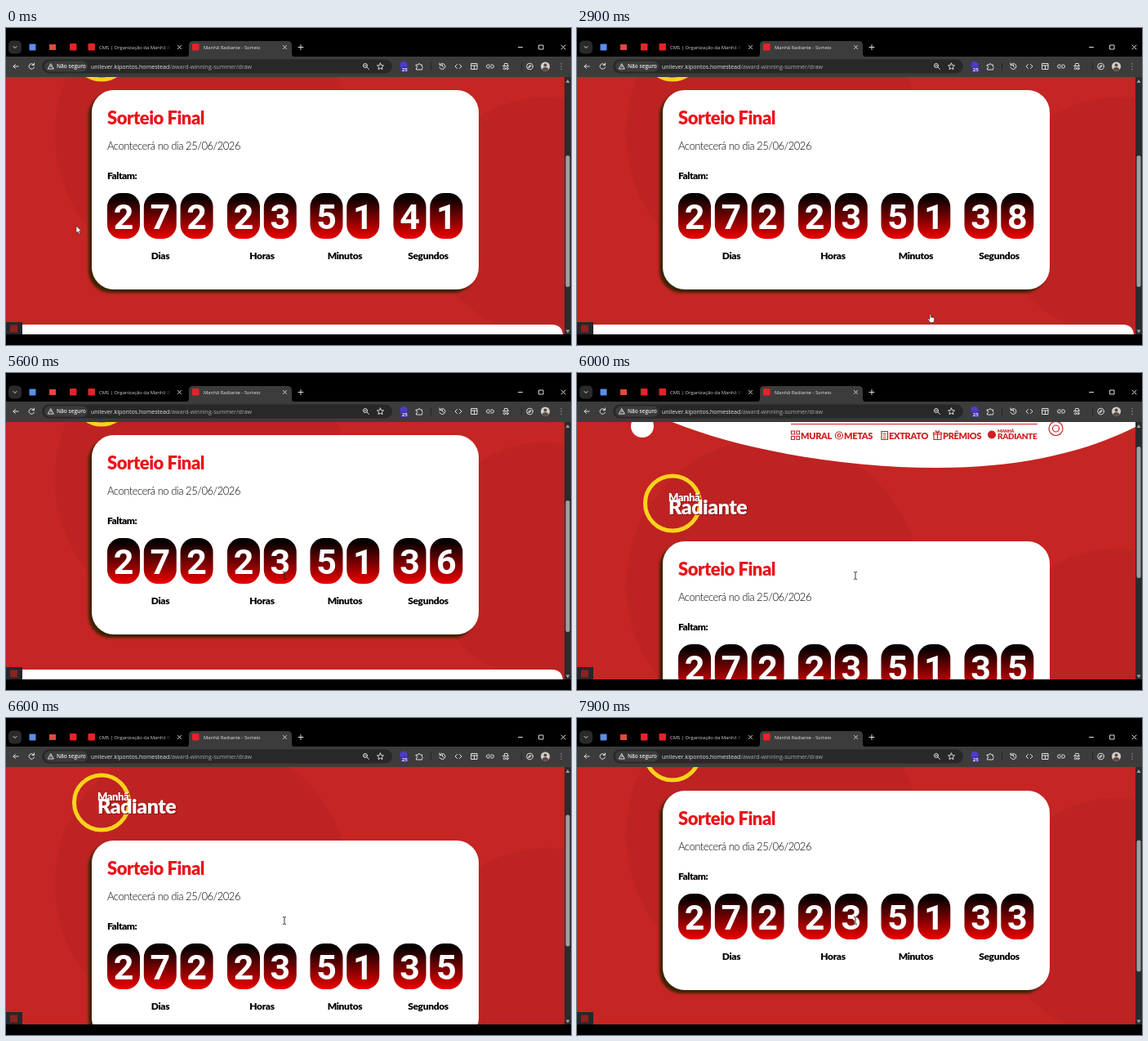
Animation of 692 by 388 pixels, one loop 8 s. Source, as an HTML page:

```html
<!DOCTYPE html>
<html lang="pt-BR">
<head>
<meta charset="utf-8">
<title>Sorteio</title>
<style>
  html, body { margin: 0; width: 100%; height: 100%; overflow: hidden; background: #000; }
  svg { display: block; width: 692px; height: 388px; }
  .ui { font-family: "Open Sans", "Noto Sans", sans-serif; fill: #e3e3e3; }
  .fun { font-family: Lato, "Open Sans", sans-serif; font-weight: 900; letter-spacing: -.03em; }
  .thin { font-weight: 300; }
  .digit { font: 700 43px Roboto, "Liberation Sans", sans-serif; fill: #fff; text-anchor: middle; }
  .label { font-size: 12px; text-anchor: middle; }
  .menu { fill: #cf2120; font-size: 11px; }
  .line { fill: none; stroke: #dedede; stroke-width: 1; stroke-linecap: round; stroke-linejoin: round; }
  .red { fill: none; stroke: #cf2120; stroke-width: 1.2; }
</style>
</head>
<body>
<svg viewBox="0 0 692 388" xmlns="http://www.w3.org/2000/svg">
  <defs>
    <linearGradient id="pill" x2="0" y2="1">
      <stop offset=".1" stop-color="#080000"/>
      <stop offset="1" stop-color="#ee0000"/>
    </linearGradient>
    <linearGradient id="fade" gradientUnits="userSpaceOnUse" x1="114" x2="203" y1="0" y2="0">
      <stop offset=".86" stop-color="#d5d5d5"/>
      <stop offset="1" stop-color="#d5d5d5" stop-opacity="0"/>
    </linearGradient>
    <filter id="soft" x="-10%" y="-10%" width="120%" height="120%">
      <feGaussianBlur stdDeviation="1.8"/>
    </filter>
    <clipPath id="view"><rect y="60" width="684" height="315"/></clipPath>
    <clipPath id="face"><circle cx="660.5" cy="47" r="5.5"/></clipPath>
  </defs>

  <rect width="692" height="388"/>

  <!-- Page -->
  <g clip-path="url(#view)">
    <rect y="60" width="684" height="315" fill="#c52523"/>
    <g id="page">
      <circle cx="240" cy="130" r="180" fill="#bd2322"/>
      <circle cx="660" cy="230" r="145" fill="#bd2322"/>

      <g transform="translate(0 -130)">
        <path d="M60 10L112 58C200 95 330 116 440 116C540 116 620 98 684 66V-80H60Z" fill="#fff"/>
        <circle cx="80" cy="65" r="14" fill="#fff"/>
        <path class="red" d="M262 62.5H564" stroke-width=".7"/>
        <g class="red">
          <path d="M262.5 71h4v4h-4zM269 71h3.5v4H269zM262.5 77.500h4v4h-4zM269 77.500h3.500v4H269z"/>
          <circle cx="321" cy="76.500" r="4.500"/><circle cx="321" cy="76.500" r="1.800"/>
          <path d="M373 71.500h7.500v10H373zM375 74.500h3.500M375 77h3.500M375 79.500h3.500"/>
          <path d="M437 75h9v6.500h-9zM436.500 73h10v2h-10zM441.500 73v8.500M441.500 73l-2.500-2.500M441.500 73l2.500-2.500"/>
          <circle cx="586.500" cy="68" r="8.500"/><circle cx="586.500" cy="68" r="4"/>
        </g>
        <circle cx="508" cy="75.500" r="5" fill="#cf2120"/>
        <g class="fun menu">
          <text x="274" y="80.500">MURAL</text>
          <text x="327" y="80.500">METAS</text>
          <text x="382" y="80.500">EXTRATO</text>
          <text x="448" y="80.500">PRÊMIOS</text>
          <text x="515" y="72.500" font-size="5.500">MANHÃ</text>
          <text x="515" y="81" font-size="10">RADIANTE</text>
        </g>
      </g>

      <circle cx="117" cy="29.500" r="33.500" fill="none" stroke="#fbd21c" stroke-width="5"/>
      <g class="fun" id="brand"></g>

      <rect x="101" y="80" width="474" height="244" rx="27" fill="#3d2200" filter="url(#soft)"/>
      <rect x="105" y="76" width="474" height="244" rx="27" fill="#fff"/>
      <g class="fun">
        <text x="124" y="117.500" font-size="22" fill="#e9151b">Sorteio Final</text>
        <text x="124" y="149" font-size="13" class="thin">Acontecerá no dia 25/06/2026</text>
        <text x="124" y="184.500" font-size="12">Faltam:</text>
      </g>
      <g id="clock"></g>
      <path d="M0 375V363H668Q682 363 682 377V400H0Z" fill="#fff"/>
    </g>
    <rect y="360" width="20" height="15" fill="#26262c"/>
    <rect x="5" y="363.500" width="9" height="9" fill="#8d211c"/>
  </g>

  <!-- Scrollbar -->
  <rect x="684" y="60" width="8" height="315" fill="#2b2b2b"/>
  <path d="M685.500 67l2.500-4 2.500 4zM685.500 369.500l2.500 4 2.500-4z" fill="#a0a0a0"/>
  <rect id="thumb" x="685.500" y="156" width="5" height="161" rx="2.500" fill="#9f9f9f"/>

  <!-- Tabs -->
  <g class="ui">
    <rect x="3" y="15.500" width="16" height="16" rx="5" fill="#2a2a2a"/>
    <path class="line" d="M9 22.500l2 2 2-2"/>
    <rect x="28.500" y="19.500" width="8" height="8" rx="1" fill="#5b8fe8"/>
    <rect x="53" y="20" width="8" height="7" fill="#e2483d"/>
    <rect x="78" y="19" width="8.500" height="8.500" rx="1" fill="#e8222a"/>
    <rect x="100.500" y="19" width="8.500" height="8.500" rx="1" fill="#e8222a"/>
    <text x="114" y="25.700" font-size="5.900" fill="url(#fade)">CMS | Organização da Manhã R</text>
    <path d="M219 36q5 0 5-5V21q0-5 5-5H345q5 0 5 5V31q0 5 5 5Z" fill="#3c3c3c"/>
    <rect x="228" y="19" width="8.500" height="8.500" rx="1" fill="#e8222a"/>
    <text x="242" y="25.700" font-size="5.900">Manhã Radiante - Sorteio</text>
    <path class="line" stroke-width=".9" d="M210.500 21.500l4 4m0-4l-4 4M339.500 21.500l4 4m0-4l-4 4M358 23.500h6m-3-3v6M627.500 23.500h5M653 21h5v5h-5zM680 21l5 5m0-5l-5 5"/>
  </g>

  <!-- Toolbar -->
  <rect y="35" width="692" height="25" fill="#3c3c3c"/>
  <rect x="44" y="38.500" width="429" height="17" rx="8.500" fill="#282828"/>
  <rect x="47" y="40.500" width="53" height="13" rx="6.500" fill="#3c3c3c"/>
  <g class="ui">
    <text x="62" y="49.400" font-size="6.500" font-weight="600">Não seguro</text>
    <text x="104" y="49.500" font-size="7.100">unilever.kipontos.homestead<tspan fill="#a9a9a9">/award-winning-summer/draw</tspan></text>
  </g>
  <g class="line">
    <path d="M15 47H9m2.500-2.500L9 47l2.500 2.500"/>
    <path d="M34 45a3.300 3.300 0 1 0 .5 3M34.500 43v2.500H32"/>
    <path d="M55 44l3.300 6h-6.600zM55 46.300v1.500"/>
    <circle cx="440" cy="46" r="2.500"/><path d="M442 48l2.500 2.500M439 46h2"/>
    <path d="M458.500 43l1.200 2.600 2.800.3-2.100 1.900.6 2.800-2.500-1.400-2.500 1.400.6-2.800-2.100-1.900 2.800-.3z"/>
    <path d="M502.500 45h2.300a1.300 1.300 0 0 1 2.600 0h2.100v2.300a1.300 1.300 0 0 1 0 2.400v1.300h-7v-2a1.300 1.300 0 0 0 0-2.600z"/>
    <path d="M531.500 45a3.500 3.500 0 1 1-.5 3M531 43v2.500h2.500M534.500 45v2l1.500 1"/>
    <path d="M552.500 44.500l-2.500 2.500 2.500 2.500m3-5l2.500 2.500-2.500 2.500"/>
    <path d="M570 43.500h7v7h-7zM570 46h7M573.500 46v4.500"/>
    <path d="M592 45h-1.500a2 2 0 0 0 0 4h1.500m2-4h1.500a2 2 0 0 1 0 4H594m-2.500-2h3"/>
    <path d="M608.500 46.500h7M610 46.500l.6-3h3.600l.6 3"/><circle cx="610.500" cy="49.500" r="1.300"/><circle cx="614" cy="49.500" r="1.300"/>
    <circle cx="641.500" cy="47" r="3.800"/><path d="M640 48.500q0-3 3-3 0 3-3 3"/>
  </g>
  <path d="M520.500 42.500v9M631.500 42.500v9" stroke="#252525"/>
  <circle cx="487" cy="45.500" r="4.500" fill="#4c3bd0"/>
  <rect x="483.500" y="47" width="9.500" height="7" rx="1.500" fill="#4334a8"/>
  <text class="ui" x="488.300" y="52.800" font-size="6" font-weight="700" text-anchor="middle">25</text>
  <g clip-path="url(#face)">
    <rect x="654" y="41" width="13" height="13" fill="#d4cfcb"/>
    <circle cx="660.500" cy="45.500" r="2" fill="#5c4a44"/><ellipse cx="660.500" cy="52" rx="4" ry="4" fill="#5c4a44"/>
  </g>
  <path d="M680 43.800v.1M680 47v.1M680 50.200v.1" class="line" stroke-width="1.500"/>

  <!-- Pointer shapes, hot spot at 0,0 -->
  <g id="pointer">
    <path id="arrow" d="M0 0V9L2.100 7.200 3.500 10.300 4.900 9.700 3.500 6.700H6.300Z" fill="#fff" stroke="#222" stroke-width=".6"/>
    <path id="hand" d="M0 .8Q.8-.3 1.600.8V4L5 4.600Q6 4.800 5.800 6L5 10.500H.6L-2.200 6.600Q-2 5.300-.8 6L0 6.700Z" fill="#fff" stroke="#222" stroke-width=".6"/>
    <path id="beam" d="M-2-4Q0-4 0-3Q0-4 2-4M0-3V4M-2 5Q0 5 0 4Q0 5 2 5" fill="none" stroke="#222" stroke-width=".9"/>
  </g>
</svg>
<script>
const LOOP = 8000, STEP = 100;
const $ = id => document.getElementById(id);

function add(parent, tag, attrs, text = "") {
  const el = document.createElementNS("http://www.w3.org/2000/svg", tag);
  for (const k in attrs) el.setAttribute(k, attrs[k]);
  el.textContent = text;
  return parent.appendChild(el);
}

// Title lettering with its drop shadow
for (const [dx, fill] of [[1.2, "#8a1512"], [0, "#fff"]]) {
  add($("brand"), "text", { x: 112 + dx, y: 27 + dx, "font-size": 13, fill }, "Manhã");
  add($("brand"), "text", { x: 112 + dx, y: 43 + dx, "font-size": 25, fill }, "Radiante");
}

const groups = [
  ["Dias", "272", 124, 189], ["Horas", "23", 271, 313.5],
  ["Minutos", "51", 372.5, 415], ["Segundos", "41", 474.5, 517]
];
const digits = [];
for (const [name, value, left, mid] of groups) {
  [...value].forEach((d, i) => {
    const x = left + i * 44.8;
    add($("clock"), "rect", { x, y: 202, width: 40, height: 56, rx: 17, fill: "url(#pill)" });
    digits.push(add($("clock"), "text", { x: x + 20, y: 245.5, class: "digit" }, d));
  });
  add($("clock"), "text", { x: mid, y: 282.5, class: "fun label" }, name);
}
const seconds = digits.slice(-2);

// time, x, y
const path = [
  [0, 86, 242], [800, 86, 242], [1100, 168, 290], [1500, 270, 334], [1800, 270, 334],
  [2000, 345, 356], [2300, 432, 350], [4600, 432, 350], [4800, 330, 328],
  [5000, 221, 293], [5200, 262, 276], [5500, 341, 247.5]
];
const shapes = [[0, "arrow"], [2300, "hand"], [4700, "arrow"], [5400, "beam"]];
// time, page offset
const scroll = [
  [5600, 0], [5700, 28], [5800, 74], [5900, 110], [6000, 130], [6200, 142], [6400, 126],
  [6500, 102], [6600, 74], [6800, 42], [7000, 24], [7300, 13]
];

function at(keys, t) {
  const i = keys.findIndex(k => k[0] > t);
  if (i < 0) return keys[keys.length - 1].slice(1);
  if (i === 0) return keys[0].slice(1);
  const a = keys[i - 1], b = keys[i], f = (t - a[0]) / (b[0] - a[0]);
  return a.slice(1).map((v, n) => v + (b[n + 1] - v) * f);
}

function draw(now) {
  const t = Math.floor(now % LOOP / STEP) * STEP;
  const left = String(41 - Math.floor((t + 100) / 1000));
  seconds.forEach((el, i) => { el.textContent = left[i]; });

  const [shift] = at(scroll, t);
  $("page").setAttribute("transform", `translate(0 ${Math.round(shift)})`);
  $("thumb").setAttribute("y", 156 - shift * .507);

  const [x, y] = at(path, t);
  $("pointer").setAttribute("transform", `translate(${x} ${y})`);
  const shape = shapes.filter(s => s[0] <= t).pop()[1];
  for (const id of ["arrow", "hand", "beam"]) $(id).style.display = id === shape ? "" : "none";
}

function tick() {
  draw(performance.now());
  requestAnimationFrame(tick);
}
tick();
</script>
</body>
</html>
```
